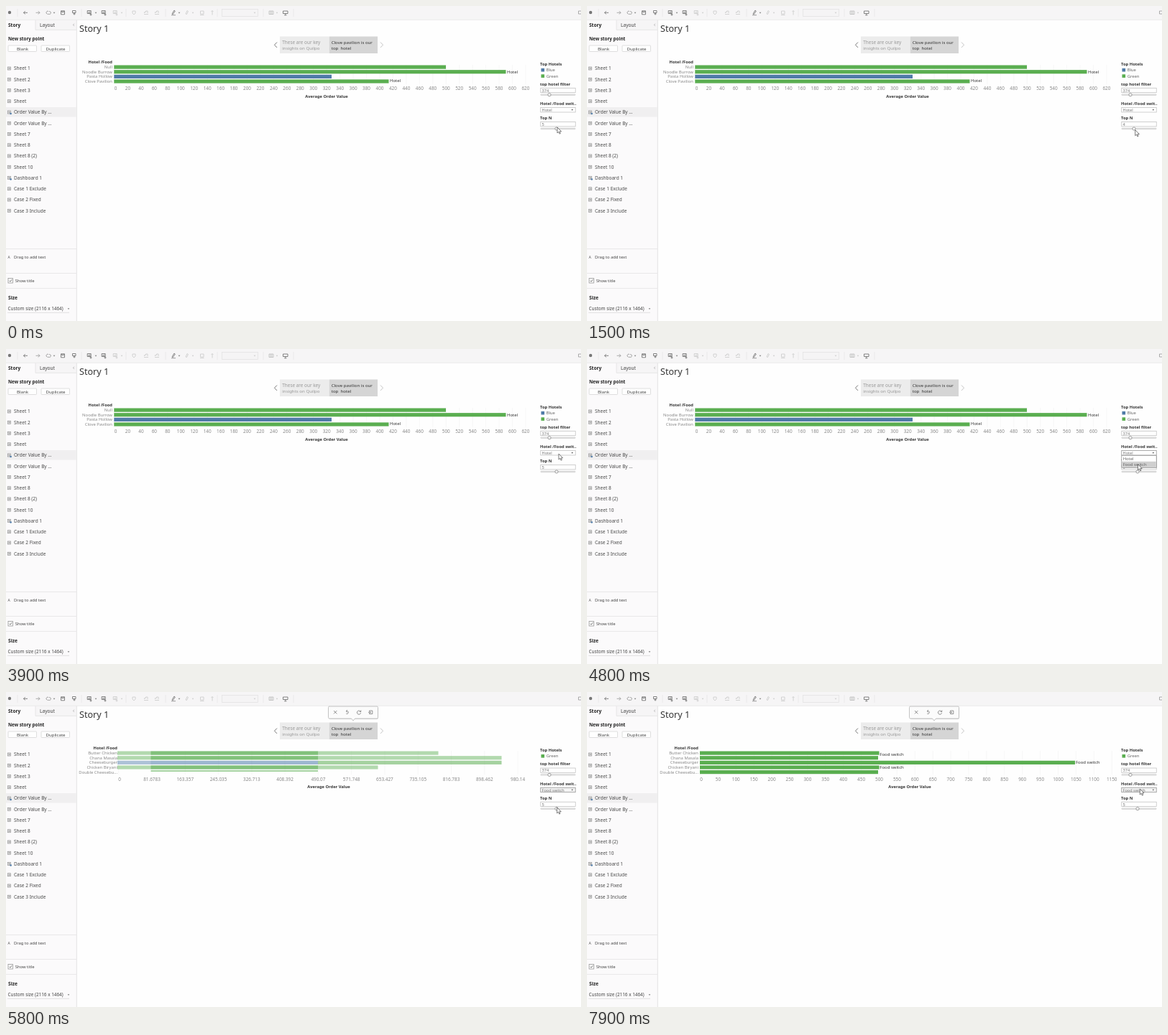
Animation of 800 by 439 pixels, one loop 8 s. Source, as an HTML page:

```html
<!DOCTYPE html>
<html lang="en">
<head>
<meta charset="utf-8">
<title>Story 1</title>
<style>
  html, body { margin: 0; width: 100%; height: 100%; overflow: hidden; background: #fefefe; }
  svg { display: block; width: 800px; height: 439px; }
  text { font-family: "Noto Sans", "Open Sans", sans-serif; white-space: pre; }
</style>
</head>
<body>
<svg id="stage" viewBox="0 0 800 439" xmlns="http://www.w3.org/2000/svg">
  <g id="frame"></g>
  <g id="chart"></g>
  <g id="panel"></g>
  <g id="pointer">
    <path d="M0 0V8L1.9 6.3L3.1 9.2L4.4 8.6L3.2 5.9H5.7Z" fill="#fff" stroke="#444" stroke-width=".7"/>
  </g>
</svg>
<script>
const LOOP = 8000, STEP = 100;
const GREEN = '#5aae50', BLUE = '#4f7ba8', INK = '#333', GREY = '#777';
const $ = id => document.getElementById(id);
const lerp = (a, b, k) => a + (b - a) * k;

// Text is placed by the middle of its capitals.
const text = (x, y, s, size = 6, fill = INK, weight = 400, anchor = 'start') =>
  `<text x="${x}" y="${y + size * .36}" font-size="${size}" fill="${fill}" font-weight="${weight}" text-anchor="${anchor}">${s}</text>`;
const rect = (x, y, w, h, fill, stroke = 'none', extra = '') =>
  `<rect x="${x}" y="${y}" width="${w}" height="${h}" fill="${fill}" stroke="${stroke}" stroke-width=".7" ${extra}/>`;
const path = (d, stroke = GREY, width = .8, fill = 'none') =>
  `<path d="${d}" stroke="${stroke}" stroke-width="${width}" fill="${fill}"/>`;
const caret = (x, y, fill = GREY) => path(`M${x - 1.3} ${y - .7}h2.6l-1.3 1.6z`, 'none', 0, fill);

function toolbar() {
  const dark = '#666', pale = '#c9c9c9';
  let s = rect(0, 0, 800, 19, '#f6f5f6') + path('M0 19.3H800', '#e4e3e4', .7);
  s += '<circle cx="5" cy="9" r="2.2" fill="#777"/>';
  s += path('M30 9.3h-5.5m2.2-2.2l-2.2 2.2l2.2 2.2', dark) + path('M41.5 9.3h5.5m-2.2-2.2l2.2 2.2l-2.2 2.2', '#999');
  s += path('M57 11a2 2 0 1 1 2-3.5m1 0a2 2 0 1 1-.5 3.8h-2', '#888') + caret(67, 9.5);
  s += path('M76.5 6.8h5v5h-5zM77.8 6.8v1.8h2.4v-1.8', dark);
  s += path('M92.5 6.5h4.5v3h-4.5zM95 9.5v3m-1.5-1.5h3', dark);
  for (const [x, c] of [[116, dark], [136, dark], [152, pale]])
    s += path(`M${x - 2.8} 6.5h5v4h-5zM${x - 1} 8v2.5m1.8-3v3M${x + .5} 12h3m-1.5-1.5v3`, c);
  s += caret(125, 9.5) + caret(161, 9.5, pale);
  s += path('M176 7h4v3l-2 2l-2-2z', pale);
  for (const x of [195, 210]) s += path(`M${x - 3} 11.5h6M${x - 2.5} 10V8.5h2V7h2.5v3`, pale);
  s += path('M231 11l3-5l1.3 1l-3 4.5z', dark) + path('M230 12.7h6', '#999', 1) + caret(241, 9.5);
  s += path('M250 11l2-4.5l1.5 1l-2 4z', pale) + caret(260, 9.5, pale);
  s += path('M270.5 7h4.5v4h-4.5zM270 12.5h5.5', pale) + path('M287 6.5v6m-1.5-4.5l1.5-1.5l1.5 1.5', pale);
  s += rect(300.5, 4.5, 50, 10, '#f5f4f5', '#e2e2e2') + caret(346, 9.5, pale);
  s += path('M366 7h6v4.5h-6zM368 7v4.5m2-4.5v4.5', '#bbb') + caret(377, 9.5, pale);
  s += path('M385.5 7h6.5v3.5h-6.5zM388.8 10.5v2m-1.6 .3h3.2', dark);
  for (const x of [16, 105, 167, 222, 294, 358, 400]) s += path(`M${x} 4v11`, '#e6e6e6', .7);
  return s + path('M796.5 7h4v4h-4z', '#999');
}

function sidebar() {
  const sheets = ['Sheet 1', 'Sheet 2', 'Sheet 3', 'Sheet', 'Order Value By ...', 'Order Value By ...', 'Sheet 7',
    'Sheet 8', 'Sheet 8 (2)', 'Sheet 10', 'Dashboard 1', 'Case 1 Exclude', 'Case 2 Fixed', 'Case 3 Include'];
  let s = rect(0, 19.5, 98, 420, '#fbfafb');
  s += rect(41, 20, 57, 13, '#f6f5f6') + path('M41 19.5V33.3H98', '#dedede', .7) + path('M98.3 19.5V439', '#dcdcdc', .8);
  s += text(3, 26.5, 'Story', 6.5, '#222', 600) + text(47, 26.5, 'Layout', 6.6, '#444');
  s += path('M94.8 24.8l-1.3 1.5l1.3 1.5', '#888', .6);
  s += text(3, 45.5, 'New story point', 6.3, '#222', 600);
  for (const [x, name] of [[3, 'Blank'], [49, 'Duplicate']])
    s += rect(x, 55, 39.5, 8.5, '#fefefe', '#d2d2d2', 'rx=".8"') + text(x + 20, 59.4, name, 6.1, '#444', 400, 'middle');
  s += rect(0, 141, 98, 13.5, '#f0eff0');
  sheets.forEach((name, i) => {
    const y = 87 + i * 15.25;
    s += rect(2.6, y - 2, 4, 4, '#fff', '#888') + path(`M3.2 ${y}h2.8m-1.4-1.4v2.8`, '#777', .6);
    if (i == 4 || i == 10) s += `<circle cx="6.6" cy="${y + 2}" r="1.3" fill="${BLUE}"/>`;
    s += text(11, y, name, 6.5, '#4a4a4a');
  });
  for (const y of [338.5, 372.5, 393.5]) s += path(`M0 ${y}H98`, '#e2e1e2', .7);
  s += text(2.5, 350, 'A', 5, '#555') + text(11, 350, 'Drag to add text', 5.8, '#444');
  s += rect(3, 379.5, 6.5, 6.5, '#fff', '#888') + path('M4.5 382.8l1.3 1.4l2.4-3', '#555');
  s += text(12.7, 383, 'Show title', 5.85, '#444') + text(3, 407, 'Size', 6.7, '#222', 600);
  return s + text(2.5, 422, 'Custom size (2116 x 1464)', 6.35, '#444') + caret(87, 422) + path('M2 427.3H88', '#d5d5d5', .7);
}

function storyNav() {
  return text(102, 31, 'Story 1', 12.6, '#333')
    + path('M377 50.5l-3.5 3.7l3.5 3.7', '#777', 1) + path('M521 50.5l3.5 3.7l-3.5 3.7', '#c4c4c4', 1)
    + rect(381, 42.5, 68, 23.5, '#ececec') + rect(449.5, 42.5, 67.5, 23.5, '#d5d5d5')
    + text(384.3, 50.5, 'These are our key', 6.4, '#999') + text(384.3, 59, 'insights on Quilpo', 6.1, '#999')
    + text(452.7, 50.5, 'Clove pavilion is our', 6.1, '#333') + text(452.7, 59, 'top  hotel', 6.1, '#333');
}

const rowY = i => 85.1 + i * 6.63;
const bar = (i, x0, x1, fill, opacity = 1, h = 5.2) =>
  rect(x0, rowY(i) - 2.6, x1 - x0, h, fill, 'none', `opacity="${opacity}"`);

function axis(zero, gap, step, count, rows) {
  const y = rowY(rows) + 3.4;
  let grid = '', labels = '';
  for (let k = 0; k <= count; k++) {
    const x = zero + k * gap;
    grid += path(`M${x} 82V${rowY(rows) - 3}`, '#f2f2f2', .6);
    labels += text(x + (k ? 0 : 1.5), y, +(k * step).toPrecision(6), 6.4, '#888', 400, 'middle');
  }
  return grid + labels + text(rows == 4 ? 446 : 449, y + 10.6, 'Average Order Value', 5.75, INK, 600, 'middle');
}

const rowNames = (names, x) => names.map((n, i) => text(x, rowY(i), n, 5.9, '#888', 400, 'end')).join('');
const HOTELS = ['Null', 'Noodle Burrow', 'Pasta Hollow', 'Clove Pavilion'];
const FOODS = ['Butter Chicken', 'Chana Masala', 'Cheeseburger', 'Chicken Biryani', 'Double Cheesebu...'];
const OLD_END = [612, 695.5, 453, 532.5];
const MID_END = [601.5, 689.5, 434, 517.5];
const MID = .7327394;

function hotelChart() {
  return text(148, 77.7, 'Hotel /Food', 5.75, INK, 600, 'end') + axis(151, 18.45, 20, 31, 4) + rowNames(HOTELS, 148)
    + OLD_END.map((x, i) => bar(i, 150.3, x, i == 2 ? BLUE : GREEN)).join('')
    + text(697, 92, 'Hotel') + text(534, 104, 'Hotel');
}

function foodChart(p) {
  let s = text(155, 77.7, 'Hotel /Food', 5.75, INK, 600, 'end');
  if (p == 0) s += axis(158.3, 18.21, 20, 31, 5);
  else if (p == 1) s += axis(157.5, 24.9, 50, 23, 5);
  else s += axis(156.7, 46.28, lerp(50.83, 92.93, p), 12, 5);
  s += rowNames(FOODS, 155);

  const k = p / MID, rest = Math.min(1, (1 - p) / (1 - MID)), fade = 1 - p * p;
  if (p < 1) OLD_END.forEach((x, i) => {
    s += bar(i, lerp(150.3, 155, k), lerp(x, MID_END[i], k), i == 2 ? BLUE : GREEN, fade);
  });
  if (p > 0) for (let i = 0; i < 5; i++) {
    const x0 = lerp(157, 201.5, rest), x1 = lerp(i % 2 || i == 4 ? 405 : 406.5, 434, rest);
    if (i == 2) {
      s += bar(i, lerp(157, 434, rest), lerp(679, 689.5, rest), GREEN, p * p);
      if (p < 1) s += bar(i, x0, x1, BLUE, fade * .35);
    } else s += bar(i, x0, i == 3 ? lerp(406.5, 434, rest) : x1, GREEN, p * p, i == 4 ? lerp(5.2, 2, rest) : 5.2);
  }
  if (p == 0) s += text(697, 98.5, 'Food switch');
  if (p == 1) s += text(407.3, 86.5, 'Food switch') + text(680, 98.3, 'Food switch') + text(407.3, 105, 'Food switch');
  return s;
}

function popup() {
  return rect(449.5, 21, 68.5, 17, '#ddd', 'none', 'rx="2"')
    + path('M450 20h66a1.5 1.5 0 0 1 1.5 1.5v14a1.5 1.5 0 0 1-1.5 1.5h-30.5l-2.5 3l-2.5-3H450a1.5 1.5 0 0 1-1.5-1.5v-14A1.5 1.5 0 0 1 450 20z', '#b5b5b5', .8, '#fbfbfb')
    + path('M456 26l4.4 4.4m0-4.4l-4.4 4.4', '#777')
    + path('M473.3 26.7h2a2 2 0 1 1-2 3.5M474.8 25l-1.7 1.7l1.7 1.6', '#777')
    + path('M493.3 27.3a2.6 2.6 0 1 0 .3 1.8M493.8 25.5v2h-2', '#777')
    + path('M505.5 26h4.3v4.5h-4.3v-1.2m0-2V26m-1.5 2.3h3.5m-1.2-1.2l1.2 1.2l-1.2 1.2', '#777');
}

const slider = (x, y) => rect(743.8, y - .7, 48.4, 1.4, '#ededed', '#c8c8c8', 'rx=".7"')
  + `<circle cx="${x}" cy="${y}" r="2.1" fill="#fff" stroke="#777" stroke-width=".7"/>`;
const field = (y, value, edge = '#bbb', fill = '#fff') =>
  rect(743.8, y - 3.2, 48.4, 6.4, fill, edge) + text(745.5, y + .1, value, 5.6, GREY);

function controls(food, n, open) {
  const up = food ? 8.3 : 0;
  const title = (y, s) => text(743, y, s, 5.8, INK, 600);
  const key = (y, color, name) => rect(744.5, y - 2.3, 4.6, 4.6, color) + text(751.7, y, name, 5.85, '#666');
  let s = title(80.7, 'Top Hotels');
  if (!food) s += key(89.2, BLUE, 'Blue');
  s += key(97.6 - up, GREEN, 'Green');
  s += title(108.6 - up, 'top hotel filter') + field(117.5 - up, '374') + slider(756, 123.7 - up);
  s += title(136.2 - up, 'Hotel /Food swit..');
  s += field(144.8 - up, food ? 'Food switch' : 'Hotel', food || open ? '#888' : '#bbb', food ? '#f4f4f4' : '#fff');
  s += caret(787.8, 144.8 - up, '#555');
  s += title(156 - up, 'Top N') + field(164.7 - up, n) + slider(n == 5 ? 766 : 761, 171 - up);
  if (open) s += rect(744.5, 149, 48.5, 17, '#bbb') + rect(743.8, 148.3, 48.4, 16.7, '#fff', '#888')
    + rect(744.2, 156.8, 47.6, 7.9, '#cfcfcf') + text(745.7, 152.8, 'Hotel', 5.9, '#666') + text(745.7, 160.8, 'Food switch', 5.9, '#666');
  return s;
}

// time, x, y of the pointer tip
const TRACK = [[0, 767, 169], [200, 767, 170], [800, 762.7, 172.7], [1700, 762.7, 172.7], [2200, 767, 171], [2500, 767, 170],
  [3000, 767, 158], [3600, 769, 146], [4200, 769, 146], [4800, 766.5, 160.7], [6400, 766.7, 161], [7100, 768, 145], [7900, 769.3, 135]];
// progress of the switch from hotels to foods
const MORPH = [[5600, 0], [5700, .38], [5800, MID], [5900, .93], [6000, 1]];

function sample(keys, t) {
  const i = keys.findIndex(k => k[0] > t);
  if (i < 0) return keys[keys.length - 1].slice(1);
  if (i == 0) return keys[0].slice(1);
  const a = keys[i - 1], b = keys[i], k = (t - a[0]) / (b[0] - a[0]);
  return a.slice(1).map((v, j) => lerp(v, b[j + 1], k));
}

function draw(t) {
  const food = t >= 5300, open = t >= 4100 && !food;
  const n = t >= 600 && t < 2100 ? 4 : 5;
  $('chart').innerHTML = food ? foodChart(sample(MORPH, t)[0]) + popup() : hotelChart();
  $('panel').innerHTML = controls(food, n, open);
  $('pointer').setAttribute('transform', `translate(${sample(TRACK, t)})`);
}

$('frame').innerHTML = sidebar() + toolbar() + storyNav();
const start = performance.now();
let shown = -1;
function tick() {
  const t = Math.floor((performance.now() - start) % LOOP / STEP) * STEP;
  if (t != shown) draw(shown = t);
  requestAnimationFrame(tick);
}
tick();
</script>
</body>
</html>
```
